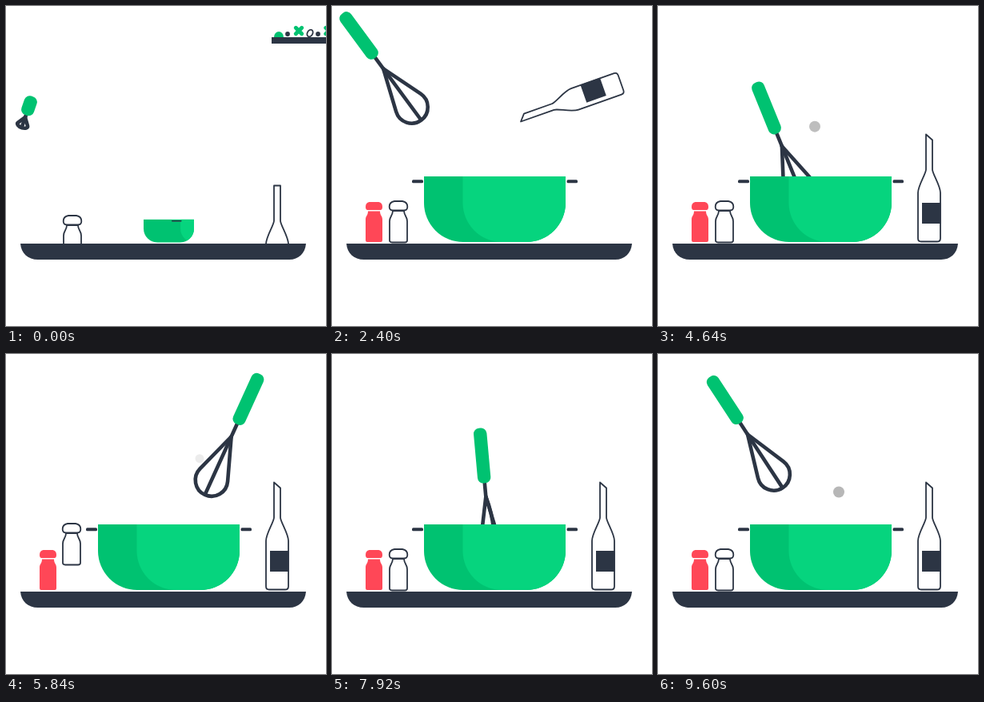
Recreate the animation shown at these times as an HTML page. Size 400 by 400 pixels, loop 9.68 s.

```html
<!DOCTYPE html>
<html lang="en">
<head>
<meta charset="utf-8">
<title>Cooking</title>
<style>
html, body { margin: 0; width: 100%; height: 100%; overflow: hidden; background: #fff; }
svg { display: block; width: 100vw; height: 100vh; }
.dark { fill: #2c3544; }
.green { fill: #00c271; }
.line { fill: #fff; stroke: #2c3544; stroke-width: 1.8; stroke-linejoin: round; }
.wire { fill: none; stroke: #2c3544; stroke-width: 4.6; stroke-linecap: round; stroke-linejoin: round; vector-effect: non-scaling-stroke; }
.red { fill: #ff4757; }
</style>
</head>
<body>
<svg viewBox="0 0 400 400">
  <defs>
    <clipPath id="above"><rect width="400" height="297"/></clipPath>
    <clipPath id="bowl"><path d="M115 213H292V246A49 49 0 0 1 243 295H164A49 49 0 0 1 115 246Z"/></clipPath>
    <g id="jar">
      <path d="M-5 -52H5Q11.300 -51 11.300 -45Q11.300 -40.500 7 -40.500H-7Q-11.300 -40.500 -11.300 -45Q-11.300 -51 -5 -52Z"/>
      <path d="M-7 -40C-7 -34 -11 -33 -11 -27V-3Q-11 -0.500 -8 -0.500H8Q11 -0.500 11 -3V-27C11 -33 7 -34 7 -40Z"/>
    </g>
  </defs>
  <g id="bubbles"></g>
  <g id="board">
    <rect class="dark" y="-4" width="180" height="8"/>
  </g>
  <g id="items"></g>
  <g id="whisk">
    <g id="wires">
      <path class="wire" d="M0 64V86"/>
      <path class="wire" id="loop"/>
      <path class="wire" id="mid"/>
    </g>
    <rect class="green" id="grip" x="-8.2" width="16.4" rx="7"/>
  </g>
  <g clip-path="url(#above)">
    <g id="pot">
      <rect class="dark" id="earL" y="217.300" width="14" height="4" rx="1.5"/>
      <g clip-path="url(#bowl)">
        <rect class="green" x="115" y="213" width="177" height="83"/>
        <path id="shine" fill="#06d47e" d="M163.500 213V246A49 49 0 0 0 212.500 295H300V213Z"/>
      </g>
      <rect class="dark" id="earR" y="217.300" height="4" rx="1.5"/>
    </g>
    <g id="pepper" class="red">
      <path d="M-6 -50H6Q10.500 -49 10.500 -44Q10.500 -40 8 -40H-8Q-10.500 -40 -10.500 -44Q-10.500 -49 -6 -50Z"/>
      <path d="M-7.500 -38.500H7.500C7.500 -33 10.500 -33 10.500 -28V-2Q10.500 0 8.500 0H-8.500Q-10.500 0 -10.500 -2V-28C-10.500 -33 -7.500 -33 -7.500 -38.500Z"/>
    </g>
    <use href="#jar" id="salt" class="line"/>
    <g id="bottle">
      <path class="line" id="glass"/>
      <rect class="dark" x="-9" y="-48.500" width="23.500" height="26"/>
    </g>
  </g>
  <path class="dark" d="M18 297H375C374 309 366 317 354 317H40C27 317 19 309 18 297Z"/>
</svg>
<script>
const LOOP = 9680, STEP = 80;
const $ = id => document.getElementById(id);
const set = (el, attrs) => { for (const k in attrs) el.setAttribute(k, attrs[k]); };
const make = (parent, tag, attrs) => {
  const el = document.createElementNS('http://www.w3.org/2000/svg', tag);
  set(el, attrs);
  return parent.appendChild(el);
};
const clamp = p => Math.min(1, Math.max(0, p));
const part = (t, a, b) => clamp((t - a) / (b - a));
const smooth = p => p * p * (3 - 2 * p);
const out = p => 1 - (1 - p) ** 3;
const mix = (a, b, p) => a + (b - a) * p;
const place = (el, x, y, r = 0, more = '') =>
  el.setAttribute('transform', `translate(${x} ${y}) rotate(${r}) ${more}`);

// Keys are [time, x, y, angle]
function track(keys, t) {
  let i = 0;
  while (i < keys.length - 2 && t >= keys[i + 1][0]) i++;
  const a = keys[i], b = keys[i + 1], p = smooth(part(t, a[0], b[0]));
  return [1, 2, 3].map(k => mix(a[k], b[k], p));
}

// Ingredients: kind, place along the board, height, slide start, slide rate
const ITEMS = [
  ['dot', 20, -8, 500, 2], ['dome', 9, -4, 500, 1], ['clover', 34, -12, 500, 1],
  ['ring', 48, -9, 500, 1], ['dot', 58, -8, 610, 1], ['clover', 71.5, -12, 610, 1],
  ['ring', 86, -9, 610, 1], ['box', 99.5, -8, 610, 1], ['leaf', 112.5, -7, 610, 1],
  ['box', 125, -8, 610, 1]
];
const SHAPES = {
  dot: ['circle', { r: 2.9, class: 'dark' }],
  dome: ['path', { d: 'M-6 0A6 7 0 0 1 6 0Z', class: 'green' }],
  clover: ['path', { d: 'M-3.7 -3.700L3.700 3.700M3.700 -3.700L-3.700 3.700', stroke: '#00c271', 'stroke-width': 5, 'stroke-linecap': 'round' }],
  ring: ['ellipse', { rx: 3.3, ry: 4.6, class: 'line' }],
  box: ['rect', { x: -2.8, y: -2.8, width: 5.6, height: 5.6, class: 'line' }],
  leaf: ['path', { d: 'M-6 0Q-4 -5 5 -4Q6 1 0 4Z', class: 'green' }]
};
const items = ITEMS.map(([kind, x, y, start, rate]) => {
  const el = make($('items'), ...SHAPES[kind]);
  return { el, x, y, start, rate: rate * 0.00021, lean: kind === 'ring' ? 30 : 0 };
});

const BUBBLES = [[3910, 196], [4900, 242], [8110, 196], [9100, 226]];
const bubbles = BUBBLES.map(([start, x]) =>
  ({ start, el: make($('bubbles'), 'circle', { cx: x, fill: '#b7b7b7' }) }));

const BOARD = [[720, 228, 42, -8], [1160, 230, 46, -30], [1440, 230, 46, -30], [1840, 320, -30, -40]];
const BOTTLE = [[1840, 339, 294.5, 0], [2080, 372, 185, -50], [2320, 361, 96, -109.5],
  [3040, 361, 96, -109.5], [3280, 372, 185, -50], [3520, 339, 294.5, 0]];
const SALT = [[5560, 83, 296, 0], [5840, 82, 264, 0], [6160, 148, 120, 130],
  [6360, 148, 132, 130], [6520, 148, 118, 130], [6680, 148, 132, 130], [6840, 148, 118, 130],
  [7120, 82, 255, 0], [7400, 83, 296, 0]];

// Whisk poses are [x, y, angle, loop width]
const LEFT = [13.1, 9.2, -36.4, 1], RIGHT = [350, 8.5, 25, 1];

function stir(t, t0) {
  const c = -Math.cos((t - t0) / 640 * 2 * Math.PI), u = 81 * c;
  return [203.5 + u, 92.5 + 3 * c * c, u * 0.273, 0.45 + 0.55 * Math.abs(c)];
}

const blend = (a, b, p, q) =>
  [mix(a[0], b[0], p), mix(a[1], b[1], q), mix(a[2], b[2], q), mix(a[3], b[3], p)];

function leave(a, b, p, bend = 2) {
  p = smooth(p);
  return blend(a, b, p, 1 - (1 - p) ** bend);
}

function enter(a, b, p) {
  p = smooth(p);
  return blend(a, b, p, p * p);
}

function whiskPose(t) {
  if (t < 560) return leave([33, 113, 19, 1], LEFT, part(t, 0, 560));
  if (t < 4000) return enter(LEFT, stir(4000, 4640), part(t, 3520, 4000));
  if (t < 5600) return stir(t, 4640);
  if (t < 6600) return leave(stir(5600, 4640), RIGHT, part(t, 5600, 6080), 2.4);
  if (t < 7736) return enter(RIGHT, stir(7736, 9336), part(t, 7256, 7736));
  if (t < 9336) return stir(t, 9336);
  return leave(stir(9336, 9336), LEFT, part(t, 9336, 9846));
}

function drawWhisk(t) {
  const [x, y, r, w] = whiskPose(t), g = out(part(t, 0, 480));
  const grip = 69 * mix(0.36, 1, g), a = 19 * w;
  place($('whisk'), x, y, r);
  set($('grip'), { height: grip });
  place($('wires'), 0, grip, 0, `scale(${mix(0.33, 1, g)} ${mix(0.17, 1, g)}) translate(0 -69)`);
  set($('loop'), { d: `M0 86L${-a} 138.800A${20.2 * w} 20.2 0 1 0 ${a} 138.800Z` });
  set($('mid'), { d: `M0 86Q${28 * (1 - w)} 128 0 165` });
}

function drawBoard(t) {
  const p = smooth(part(t, 0, 720));
  const [x, y, r] = t < 720 ? [mix(332, 228, p), mix(43, 42, p), -8 * p] : track(BOARD, t);
  place($('board'), x, y, r);
  const c = Math.cos(r * Math.PI / 180), s = Math.sin(r * Math.PI / 180);
  for (const it of items) {
    const edge = it.start + Math.sqrt((it.x + 4) / it.rate);
    const slide = it.rate * Math.max(0, Math.min(t, edge) - it.start) ** 2;
    const fall = Math.max(0, t - edge), lx = it.x - slide;
    const px = x + lx * c - it.y * s - fall * 0.05;
    const py = y + lx * s + it.y * c + fall * fall * 0.0012;
    place(it.el, px, py, r + it.lean - fall * 0.3);
    set(it.el, { visibility: py > 232 || fall > 500 ? 'hidden' : 'visible' });
  }
}

function drawPot(t) {
  const g = out(part(t, 0, 480)), k = mix(0.356, 1, g);
  place($('pot'), 203.5, 296, 0, `scale(${k}) translate(-203.5 -296)`);
  place($('shine'), mix(81, 0, g), 0);
  set($('earL'), { x: mix(150, 100, g) });
  set($('earR'), { x: mix(213.5, 293.5, g), width: mix(35, 13.5, g) });
}

function drawJars(t) {
  const g = out(part(t, 0, 480));
  place($('pepper'), 52.5, 295 + 54 * (1 - out(part(t, 80, 560))));
  const [sx, sy, sr] = track(SALT, t);
  place($('salt'), sx, sy + 18 * (1 - g), sr);
  const [bx, by, br] = track(BOTTLE, t);
  place($('bottle'), bx, by + 64 * (1 - g), br);
  set($('glass'), {
    d: `M-4 -134L4 ${mix(-134, -127, g)}V-90C4 -85 14 -70 14 -61V-4Q14 0 10 0H-10` +
       'Q-14 0 -14 -4V-61C-14 -70 -4 -85 -4 -90Z'
  });
}

function drawBubbles(t) {
  for (const b of bubbles) {
    const p = (t - b.start) / 1000;
    set(b.el, {
      cy: 220 - 95 * p,
      r: mix(7, 5, part(p, 0.75, 1)),
      opacity: p < 0 || p > 1 ? 0 : 1 - 0.8 * part(p, 0.7, 0.96)
    });
  }
}

function draw(t) {
  drawBubbles(t);
  drawBoard(t);
  drawWhisk(t);
  drawPot(t);
  drawJars(t);
}

const begin = performance.now();
function frame() {
  const t = Math.max(0, performance.now() - begin) % LOOP;
  draw(Math.floor(t / STEP) * STEP);
  requestAnimationFrame(frame);
}
frame();
</script>
</body>
</html>
```
